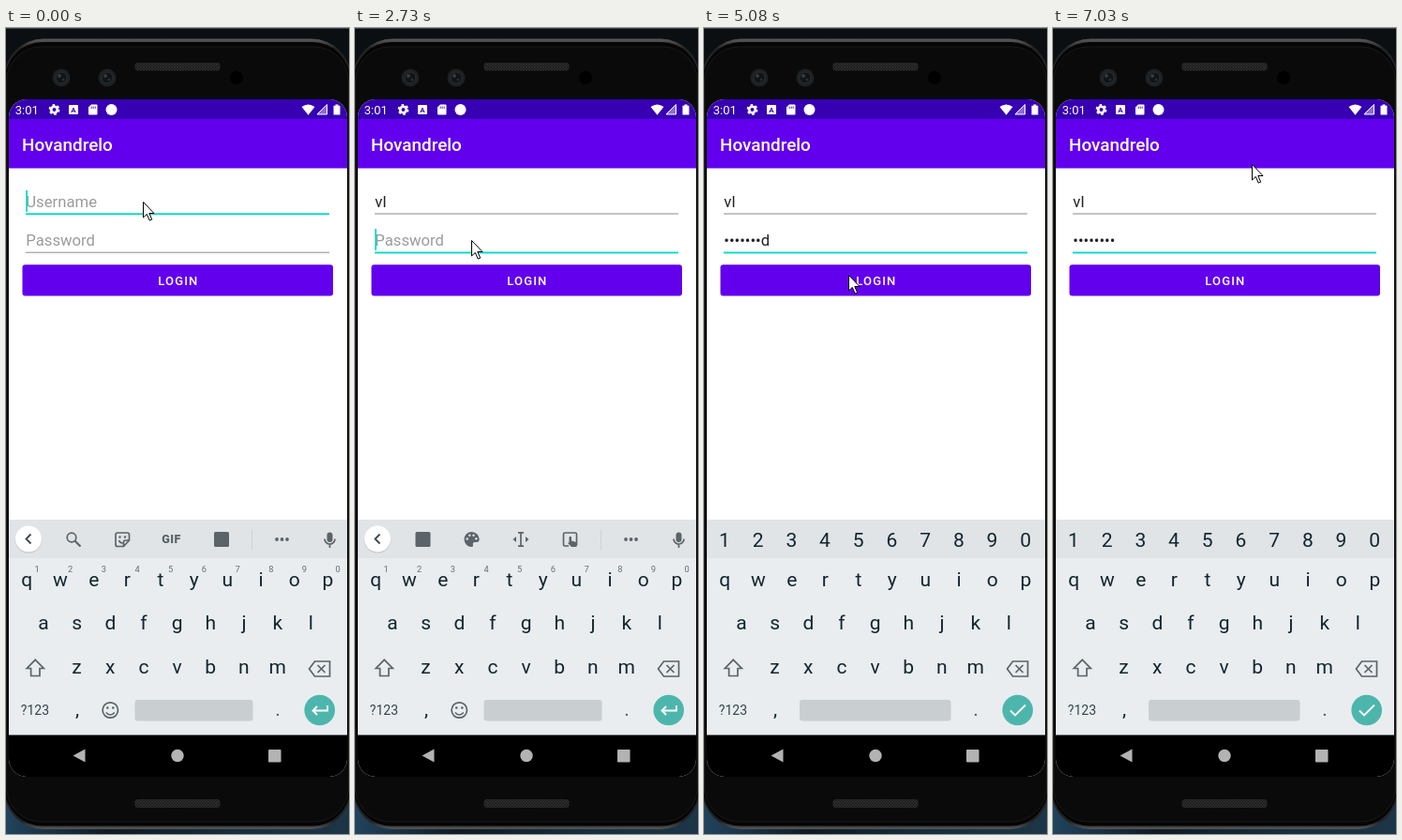
Recreate the animation shown at these times as an HTML page. Size 366 by 859 pixels, loop 8000 ms.

```html
<!DOCTYPE html>
<html lang="en">
<head>
<meta charset="utf-8">
<title>Login</title>
<style>
  html, body { margin: 0; width: 100%; height: 100%; overflow: hidden; background: #0b0e11; }
  svg { display: block; width: 366px; height: 859px; font-family: Roboto, "Noto Sans", sans-serif; }
  text { white-space: pre; }
  .mid { text-anchor: middle; }
  .field { font-size: 16.7px; fill: #212121; }
  .hint { font-size: 16.7px; fill: #9b9b9b; }
  .key { font-size: 21px; fill: #12262f; text-anchor: middle; }
  .sup { font-size: 9.3px; fill: #647078; text-anchor: middle; }
  .word { font-size: 17px; fill: #6b7276; text-anchor: middle; }
  .ico { fill: #5a6469; }
  .line { fill: none; stroke: #5a6469; stroke-width: 1.7; }
</style>
</head>
<body>
<svg viewBox="0 0 366 859" xmlns="http://www.w3.org/2000/svg">
  <defs>
    <linearGradient id="rim" x1="0" y1="0" x2="0" y2="1">
      <stop offset="0" stop-color="#5a5a5a"/><stop offset=".012" stop-color="#242424"/>
      <stop offset=".99" stop-color="#222"/><stop offset="1" stop-color="#555"/>
    </linearGradient>
    <linearGradient id="desk" x1="0" x2="1">
      <stop offset="0" stop-color="#21435c"/><stop offset=".3" stop-color="#0e1b26"/>
      <stop offset=".7" stop-color="#15303f"/><stop offset="1" stop-color="#1c3547"/>
    </linearGradient>
    <pattern id="mesh" width="3" height="3" patternUnits="userSpaceOnUse">
      <rect width="3" height="3" fill="#1c1c1c"/><path d="M0 0L3 3M3 0L0 3" stroke="#343434" stroke-width=".7"/>
    </pattern>
    <clipPath id="screen"><rect x="3" y="76" width="361" height="722" rx="19"/></clipPath>
  </defs>

  <!-- phone body -->
  <rect width="366" height="859" fill="#0c0f12"/>
  <rect y="820" width="366" height="39" fill="url(#desk)"/>
  <path d="M0 .5H366" stroke="#3c4044"/>
  <rect x="-2" y="11.5" width="370" height="842.5" rx="42" fill="url(#rim)"/>
  <rect x="-1" y="15" width="368" height="835.5" rx="40" fill="#050505"/>
  <rect x="0.5" y="20" width="365" height="826" rx="37" fill="#0a0a0a" stroke="#191919"/>
  <rect x="137.500" y="37" width="91" height="8.500" rx="3" fill="url(#mesh)"/>
  <rect x="137.500" y="822" width="91" height="9" rx="3" fill="url(#mesh)"/>
  <g id="lenses"></g>
  <circle cx="246" cy="53" r="7" fill="#000"/>

  <g clip-path="url(#screen)">
    <rect y="76" width="366" height="722" fill="#fff"/>
    <rect y="76" width="366" height="21.500" fill="#3700b3"/>
    <rect y="97" width="366" height="52.500" fill="#6200ee"/>

    <!-- status bar -->
    <g fill="#fff">
      <text x="9.700" y="91.700" font-size="13">3:01</text>
      <circle cx="51.500" cy="87" r="3.300" fill="none" stroke="#fff" stroke-width="2.600"/>
      <circle cx="51.500" cy="87" r="5" fill="none" stroke="#fff" stroke-width="1.800" stroke-dasharray="2.618 2.618"/>
      <rect x="67" y="82" width="10" height="10" rx="1"/>
      <text class="mid" x="72" y="90" font-size="8" font-weight="700" style="fill:#3700b3">A</text>
      <path d="M91 81.500h5.500q1 0 1 1v9q0 1-1 1h-7.500q-1 0-1-1v-7z"/>
      <path d="M91.200 83.500v2.500M93.200 83.500v2.500M95.200 83.500v2.500" stroke="#3700b3" stroke-width=".8"/>
      <circle cx="112.500" cy="87" r="6"/>
      <path d="M315.500 84q7-5 14 0L322.500 92.700z"/>
      <path d="M342.500 81.500V92H332z" fill="#8d6ad2"/>
      <path d="M342.500 81.500V92H332z" fill="none" stroke="#fff"/>
      <path d="M349.500 82.700h2v-1.200h3v1.200h2V92.500h-7z"/>
    </g>
    <text x="17" y="131" font-size="18.900" font-weight="500" fill="#fff">Hovandrelo</text>

    <!-- form -->
    <text id="userHint" class="hint" x="21.300" y="191">Username</text>
    <text id="passHint" class="hint" x="21.300" y="232.300">Password</text>
    <text id="user" class="field" x="21.300" y="191"></text>
    <text id="pass" class="field" x="21.300" y="232.300"></text>
    <rect id="compose" x="21.500" y="191.500" width="12" height="1" fill="#444"/>
    <rect id="userLine" x="21" width="324"/>
    <rect id="passLine" x="21" width="324"/>
    <rect id="caret" width="1.700" height="23" fill="#03dac5"/>
    <g id="shade">
      <rect x="18" y="254" width="331" height="35" rx="4" fill="#000" opacity=".09"/>
      <rect x="18" y="254" width="331" height="33.500" rx="4" fill="#000" opacity=".17"/>
    </g>
    <rect x="17.500" y="252.300" width="331.500" height="33.200" rx="3" fill="#6200ee"/>
    <rect id="press" x="17.500" y="252.300" width="330.300" height="32.500" rx="3" fill="#883df2"/>
    <text class="mid" x="183.900" y="274" font-size="13" font-weight="500" letter-spacing="1.160" fill="#fff">LOGIN</text>

    <!-- keyboard -->
    <rect y="524" width="366" height="230" fill="#e9edf0"/>
    <rect y="524" width="366" height="41" fill="#e0e4e7"/>
    <g id="keys"></g>
    <g id="textKeys">
      <g id="sups"></g>
      <g class="line" stroke-width="1.500">
        <circle cx="111.300" cy="727" r="8.200"/><path d="M106.800 729.500q4.500 5 9 0"/>
      </g>
      <circle class="ico" cx="108.300" cy="724.500" r="1.300"/><circle class="ico" cx="114.300" cy="724.500" r="1.300"/>
      <path class="ico" d="M342.500 540.500a3 3 0 0 1 6 0v4.500a3 3 0 0 1-6 0z"/>
      <path class="line" d="M340 544.500a5.500 5.500 0 0 0 11 0M345.500 550v4"/>
      <circle cx="24" cy="545.300" r="14.300" fill="#000" opacity=".13"/>
      <circle cx="24" cy="544.500" r="14" fill="#fff"/>
      <path id="chevron" fill="none" stroke="#3c474d" stroke-width="1.800"/>
    </g>
    <g id="words">
      <text class="word" x="83" y="551">vl</text>
      <text class="word" x="182" y="551" style="fill:#101a1f;font-weight:700">VL</text>
      <text class="word" x="280" y="551">v</text>
      <path d="M130.500 534v22M234.500 534v22" stroke="#c3c9cc"/>
    </g>
    <g id="tools">
      <path d="M262.500 535v21" stroke="#cdd2d5"/>
      <g class="ico"><circle cx="289" cy="545" r="1.900"/><circle cx="294.500" cy="545" r="1.900"/><circle cx="300" cy="545" r="1.900"/></g>
    </g>
    <g id="toolsA">
      <circle class="line" cx="70" cy="543" r="4.800"/><path class="line" d="M73.500 546.500L79.500 552.500" style="stroke-width:2.200"/>
      <path class="line" d="M131.500 546V540q0-2-2-2H119q-2 0-2 2v10.500q0 2 2 2h6.500zM125.500 552v-4q0-2 2-2h4M120.500 546q1 3 4 3"/>
      <circle class="ico" cx="121.500" cy="542.500" r="1.200"/><circle class="ico" cx="127" cy="542.500" r="1.200"/>
      <text class="mid ico" x="176.500" y="549.300" font-size="12.500" font-weight="900" letter-spacing=".4">GIF</text>
      <rect class="ico" x="222" y="537" width="16" height="16" rx="1.500"/>
    </g>
    <g id="toolsB">
      <rect class="ico" x="64.500" y="537" width="16" height="16" rx="1.500"/>
      <path class="ico" d="M124.500 537a8 8 0 0 0 0 16q2.300-.5 1.200-3q0-2 2-2h2q3 0 3-3.500q-1-7-8.200-7.500z"/>
      <g fill="#e0e4e7"><circle cx="119.700" cy="544.500" r="1.200"/><circle cx="122.300" cy="540.800" r="1.200"/><circle cx="126.500" cy="540.800" r="1.200"/><circle cx="129.300" cy="544.200" r="1.200"/></g>
      <path class="line" d="M177 538v14M174 537.800h6M174 552.200h6"/>
      <path class="ico" d="M172 542v6l-3.500-3zM182 542v6l3.500-3z"/>
      <path class="line" d="M228 552H224q-1.500 0-1.500-1.500V539.500q0-1.500 1.500-1.500h11q1.500 0 1.500 1.500v12"/>
      <path class="ico" d="M228.500 542.500q1.500-1.500 2.500 0v4l5.500 1.500v5h-5.500l-4-4 1.500-1z"/>
    </g>
    <g id="numbers"></g>

    <text x="15.800" y="732" font-size="14" fill="#33434b">?123</text>
    <text class="key" x="76" y="733">,</text>
    <text class="key" x="290" y="733" style="fill:#4b585f">.</text>
    <rect id="space" y="716" height="22.500" rx="3" fill="#c9ced1"/>
    <path class="line" d="M31.300 673.300L40.300 682.500H36V690.500H26.600V682.500H22.300z"/>
    <path class="line" d="M329.500 675H345.500V691H329.500L323.500 683zM332.500 679l8 8M340.500 679l-8 8"/>
    <circle cx="334.700" cy="727" r="16.300" fill="#4db6ac"/>
    <path id="action" fill="none" stroke="#fff" stroke-width="1.900"/>

    <!-- navigation -->
    <rect y="753.500" width="366" height="45" fill="#000"/>
    <g fill="#b3b3b3"><path d="M84.500 768.500V782.500L71.500 775.500z"/><circle cx="183" cy="775.500" r="6.700"/><rect x="280" y="769" width="13.500" height="13.500" rx=".8"/></g>
  </g>

  <path id="mouse" d="M.5.500v16.500l3.800-3.600 2.900 6.700 2.500-1-2.900-6.600h5.200z" fill="#fff" stroke="#000" stroke-width="1"/>
</svg>
<script>
const LOOP = 8000;
const $ = id => document.getElementById(id);
const show = (id, on) => { $(id).style.display = on ? "" : "none"; };
const set = (id, attrs) => { for (const k in attrs) $(id).setAttribute(k, attrs[k]); };

// Each step is [start, ...values] and holds until the next one.
const mouseSteps = [
  [0, 146, 185], [2170, 138, 196], [2300, 128, 209], [2450, 124, 226],
  [4810, 130, 236], [4960, 143, 250], [5080, 154, 263], [5920, 72, 228],
  [6050, -4, 196], [6200, 43, 159], [6350, 310, 278], [6480, 212, 145]
];
const caretSteps = [
  [0, 1], [270, 0], [670, 1], [1220, 0], [1500, 1], [1870, 0], [2450, 1],
  [3160, 0], [3290, 1], [4960, 0], [6900, 1], [7030, 0]
];
const typeTimes = [3290, 3430, 3680, 3800, 4050, 4170, 4320, 4440];
const secret = "password";

const at = (steps, t) => steps.filter(s => s[0] <= t).pop().slice(1);

function row(chars, x, y, cls = "key") {
  return [...chars].map((c, i) =>
    `<text class="${cls}" x="${(x + 35.68 * i).toFixed(1)}" y="${y}">${c}</text>`).join("");
}

$("keys").innerHTML = row("qwertyuiop", 22.3, 595) + row("asdfghjkl", 40, 641) + row("zxcvbnm", 75.5, 688);
$("sups").innerHTML = row("1234567890", 33, 580, "sup");
$("numbers").innerHTML = row("1234567890", 22, 553);
$("lenses").innerHTML = [59, 108].map(x =>
  `<circle cx="${x}" cy="53" r="9.500" fill="#1e2123"/><circle cx="${x}" cy="53" r="6" fill="#111416" stroke="#2c3033"/>
   <circle cx="${x - 2}" cy="51" r="2" fill="#343a3f"/><circle cx="${x + 2}" cy="55" r="1.500" fill="#292e32"/>`).join("");

function password(t) {
  const n = typeTimes.filter(s => s <= t).length;
  if (!n) return "";
  return t >= 6900 ? "•".repeat(n) : "•".repeat(n - 1) + secret[n - 1];
}

function underline(id, y, active) {
  set(id, active ? { y: y - 0.7, height: 1.9, fill: "#03dac5" } : { y: y - 0.5, height: 1, fill: "#8a8a8a" });
}

function draw(t) {
  const onPass = t >= 2600, typed = t >= 1500, numeric = t >= 2880;
  const words = typed && t < 2730, pressed = t >= 5480 && t < 6900;
  const pass = password(t);

  $("user").textContent = typed ? "vl" : "";
  $("pass").textContent = pass;
  show("userHint", !typed);
  show("passHint", !pass);
  show("compose", typed && !onPass);
  underline("userLine", 198, !onPass);
  underline("passLine", 239.2, onPass);

  const field = $(onPass ? "pass" : "user");
  const width = field.textContent ? field.getComputedTextLength() : 0;
  set("caret", { x: 21.2 + width, y: onPass ? 214 : 173 });
  show("caret", at(caretSteps, t)[0]);

  show("shade", pressed);
  show("press", pressed);

  show("textKeys", !numeric);
  show("numbers", numeric);
  show("words", words);
  show("tools", !words && !numeric);
  show("toolsA", !typed);
  show("toolsB", t >= 2730 && !numeric);
  set("chevron", { d: words ? "M21.500 539.500l5 5-5 5" : "M26.500 539.500l-5 5 5 5" });
  set("space", numeric ? { x: 102, width: 161.5 } : { x: 137.5, width: 126 });
  set("action", { d: numeric ? "M327 727.500l5 5 11-11" : "M343 722v5.500H327.500M332 723l-4.500 4.500 4.500 4.500" });

  const [x, y] = at(mouseSteps, t);
  set("mouse", { transform: `translate(${x} ${y})` });
}

const start = performance.now();
function tick(now) {
  draw(Math.max(0, now - start) % LOOP);
  requestAnimationFrame(tick);
}
draw(0);
requestAnimationFrame(tick);
</script>
</body>
</html>
```
